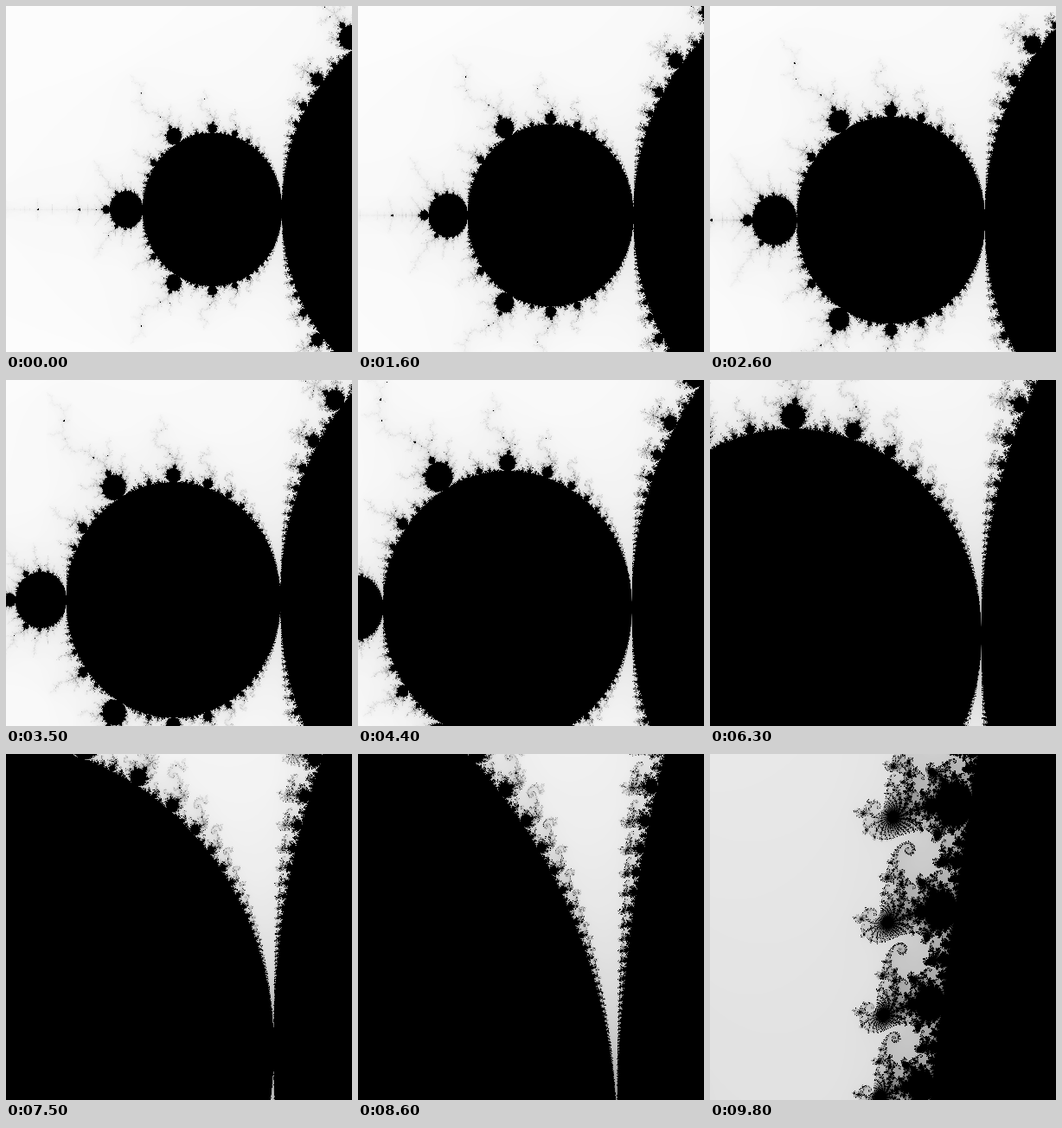
Recreate the animation shown at these times as an HTML page with a canvas. Size 400 px wide and 400 px high, loop 9900 ms.

```html
<!DOCTYPE html>
<html lang="en">
<head>
<meta charset="utf-8">
<title>Mandelbrot zoom</title>
<style>
html, body { margin: 0; width: 100%; height: 100%; overflow: hidden; background: #fff; }
canvas { display: block; width: 100vw; height: 100vh; image-rendering: pixelated; }
</style>
</head>
<body>
<canvas id="view" width="400" height="400"></canvas>
<script>
const SIZE = 400, STEPS = 99, STEP_MS = 100, LIMIT = 300;

// Zoom target and the window around it at full size
const target = { re: -0.74, im: 0.1 };
const reach = { left: 1, width: 1.24, height: 1.13 };

const ctx = document.getElementById('view').getContext('2d');
const image = ctx.createImageData(SIZE, SIZE);
const pixels = new Uint32Array(image.data.buffer);

// Main cardioid and period-2 disc never escape
function isInside(x, y) {
  const yy = y * y;
  if ((x + 1) * (x + 1) + yy <= 1 / 16) return true;
  const a = x - 0.25, q = a * a + yy;
  return q * (q + a) <= yy / 4;
}

function escapeTime(x, y) {
  if (isInside(x, y)) return LIMIT;
  let zx = 0, zy = 0, xx = 0, yy = 0, n = 0;
  while (xx + yy <= 4 && n < LIMIT) {
    zy = 2 * zx * zy + y;
    zx = xx - yy + x;
    xx = zx * zx;
    yy = zy * zy;
    n++;
  }
  return n;
}

function draw(step) {
  const scale = 1 - step / 100;
  const left = target.re - reach.left * scale;
  const top = target.im + reach.height * scale / 2;
  // First and last samples lie on the window's edges
  const dx = reach.width * scale / (SIZE - 1);
  const dy = reach.height * scale / (SIZE - 1);
  for (let row = 0, i = 0; row < SIZE; row++) {
    const y = top - row * dy;
    for (let col = 0; col < SIZE; col++, i++) {
      const gray = Math.floor(255 - 255 * escapeTime(left + col * dx, y) / LIMIT);
      pixels[i] = (0xff000000 | gray * 0x010101) >>> 0;
    }
  }
  ctx.putImageData(image, 0, 0);
}

let shown = -1;
function tick() {
  const step = Math.floor(performance.now() / STEP_MS) % STEPS;
  if (step !== shown) {
    draw(step);
    shown = step;
  }
  requestAnimationFrame(tick);
}
tick();
</script>
</body>
</html>
```
